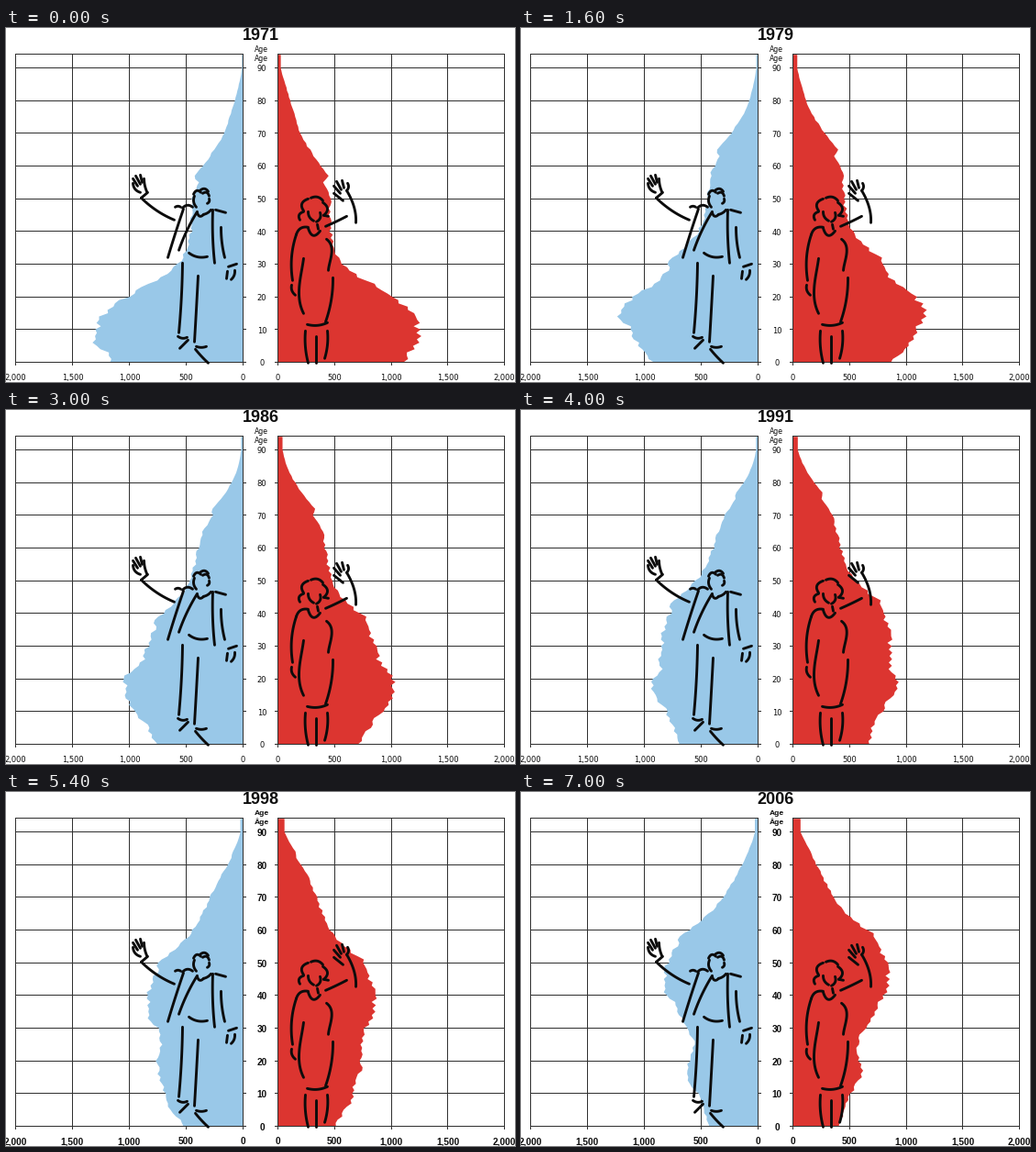
A matplotlib script for the animation above (7.2 s loop, 555x386 px).

```python
import numpy as np
import matplotlib.pyplot as plt
from matplotlib.animation import FuncAnimation

W, H, DPI = 555, 386, 100
PX = 72 / DPI                      # points per pixel
START, YEARS, BOLD_FROM = 1971, 36, 1996
BASE, TOP, PER_AGE = 364.5, 28.5, 3.567
INK, GRID = "#0c0c0c", "#303030"
AGES = np.arange(95)

# zero line, direction, pixels per 500, colour; then the course of life:
# share at birth, loss in childhood, loss around 21, age scale of survival
SIDES = {
    "left": dict(zero=258.5, sign=-1, step=62, color="#99c8e8",
                 birth=1.0, child=0.09, leave=0.30, life=78),
    "right": dict(zero=296.5, sign=1, step=61.75, color="#dc3530",
                  birth=0.945, child=0.075, leave=0.255, life=82.5),
}

# Size of each generation at birth, in pixels, at its turning points.
TURNS = [1880, 1886, 1901, 1908, 1912, 1914, 1916, 1921, 1930, 1935, 1940,
         1945, 1947, 1950, 1957, 1965, 1968, 1971, 1979, 1986, 1990, 1998, 2006]
SIZES = [28, 46, 53, 74, 87, 98, 86, 95, 93, 98, 109,
         138, 154, 158, 172, 169, 153, 146, 113, 94, 89, 65, 53]

fig = plt.figure(figsize=(W / 100, H / 100), dpi=DPI, facecolor="white")
ax = fig.add_axes([0, 0, 1, 1])
ax.set_xlim(0, W)
ax.set_ylim(H, 0)
ax.axis("off")

rng = np.random.default_rng(4)
for side in SIDES.values():
    side["ripple"] = 1 + rng.uniform(-0.03, 0.03, 130)


def widths(side, year):
    """Each generation keeps its size at birth, thinned out by age."""
    age = np.minimum(AGES, 90)
    born = year - age
    childhood = side["birth"] - side["child"] * np.minimum(age / 15, 1)
    leaving = side["leave"] / (1 + np.exp((21 - age) / 2.3))
    survival = np.exp(-(age / side["life"]) ** 7)
    size = np.interp(born, TURNS, SIZES) * side["ripple"][born - TURNS[0]]
    return size * (childhood - leaving) * survival


def outline(side, year):
    zero = side["zero"]
    x = zero + side["sign"] * widths(side, year)
    y = BASE - AGES * PER_AGE
    return np.column_stack([np.r_[zero, x, zero], np.r_[BASE, y, y[-1]]])


def rule(x0, y0, x1, y1, z=1):
    """A line exactly one pixel wide, set on pixel centres."""
    x0, y0, x1, y1 = np.floor([x0, y0, x1, y1]) + 0.5
    ax.plot([x0, x1], [y0, y1], color=GRID, lw=PX, zorder=z, snap=False,
            solid_capstyle="projecting")


def draw_grid():
    for side in SIDES.values():
        zero, sign, step = side["zero"], side["sign"], side["step"]
        end = zero + sign * 4 * step
        for k in range(5):
            x = zero + sign * k * step
            rule(x, TOP, x, BASE + 3, 3 if k == 0 else 1)
        for age in range(0, 100, 10):
            y = BASE - age * PER_AGE
            rule(zero - sign * 3, y, end, y, 3 if age == 0 else 1)
        rule(zero, TOP, end, TOP)


labels = []


def label(x, y, text, plain, bold):
    """A text with its size before and after the change of typeface."""
    item = ax.text(x, y, text, color=INK, ha="center",
                   va="center_baseline", zorder=6)
    labels.append((item, plain, bold))
    return item


def draw_labels():
    for side in SIDES.values():
        for k in range(5):
            x = side["zero"] + side["sign"] * k * side["step"]
            label(x, 380.5, f"{k * 500:,}", 8.4, 10)
    for age in range(0, 100, 10):
        label(279, BASE - age * PER_AGE + 0.5, str(age), 8.4, 10)
    label(278.5, 22.5, "Age", 7.8, 8.5)


def pen(*xy):
    """One smooth pen stroke through a few points."""
    x, y = np.array(xy[::2]) - 0.5, np.array(xy[1::2]) - 0.7
    t = np.r_[0, np.cumsum(np.hypot(np.diff(x), np.diff(y)))]
    t /= t[-1]
    deg = min(len(t) - 1, 3)
    s = np.linspace(0, 1, 24)
    ax.plot(np.polyval(np.polyfit(t, x, deg), s),
            np.polyval(np.polyfit(t, y, deg), s),
            color=INK, lw=2.9 * PX, solid_capstyle="round", zorder=5)


def draw_man():
    # raised hand and arm
    pen(139, 165, 144, 173)
    pen(142, 162, 147, 171)
    pen(147, 161, 149, 169)
    pen(151, 165, 152, 173, 154, 179)
    pen(139, 170, 141, 176, 147, 180)
    pen(155, 180, 148, 186)
    pen(148, 186, 157, 194, 170, 203, 184, 210)
    # head
    pen(206, 184, 205, 189, 208, 196)
    pen(205, 182, 209, 178, 213, 180)
    pen(212, 178, 217, 176, 221, 179)
    pen(215, 181, 219, 180, 222, 184)
    pen(222, 187, 222, 190, 220, 192)
    pen(209, 202, 212, 206, 216, 204)
    pen(216, 204, 219, 203, 224, 199)
    # jacket and arms
    pen(185, 196, 188, 195, 191, 196)
    pen(193, 197, 198, 194, 204, 196)
    pen(194, 198, 186, 222, 177, 251)
    pen(209, 201, 200, 217, 189, 243)
    pen(229, 199, 240, 202)
    pen(226, 199, 226, 230, 228, 257)
    pen(235, 218, 236, 235, 239, 251)
    pen(200, 246, 208, 250, 220, 250)
    # lowered hand
    pen(243, 261, 252, 258)
    pen(242, 266, 241, 274)
    pen(250, 265, 249, 271, 246, 275)
    # legs and shoes
    pen(193, 257, 192, 290, 189, 333)
    pen(210, 271, 208, 308, 206, 343)
    pen(188, 337, 193, 339, 198, 338)
    pen(199, 341, 190, 350)
    pen(208, 348, 213, 349, 219, 348)
    pen(207, 351, 213, 358, 221, 366)


def draw_woman():
    # hair, face and collar
    pen(321, 210, 320, 205, 325, 201)
    pen(325, 200, 323, 193, 330, 187)
    pen(333, 186, 340, 185, 346, 189)
    pen(346, 191, 351, 198, 347, 205)
    pen(347, 205, 352, 206)
    pen(330, 201, 331, 206, 336, 211)
    pen(343, 202, 343, 208, 339, 212)
    pen(330, 219, 336, 227, 343, 222)
    pen(340, 215, 341, 220)
    # sleeves and dress
    pen(330, 218, 322, 219, 317, 226)
    pen(317, 226, 313, 242, 313, 276)
    pen(312, 281, 312, 286, 316, 292)
    pen(325, 252, 322, 270, 320, 288, 325, 312)
    pen(350, 231, 355, 238, 355, 250, 352, 265)
    pen(357, 273, 355, 298, 349, 321)
    pen(329, 324, 340, 325, 351, 322)
    # legs
    pen(327, 331, 327, 349, 330, 366)
    pen(339, 337, 339, 366)
    pen(351, 331, 351, 346, 348, 361)
    # raised arm and hand
    pen(349, 217, 360, 212, 372, 206)
    pen(372, 178, 378, 190, 381, 200, 382, 213)
    pen(358, 181, 368, 189)
    pen(358, 173, 365, 181)
    pen(361, 168, 366, 177)
    pen(367, 167, 369, 175)
    pen(372, 178, 374, 174, 373, 170)


draw_grid()
draw_man()
draw_woman()
draw_labels()
second = label(278.5, 32, "Age", 7.8, 8.5)
title = ax.text(278, 6.7, "", family="Liberation Sans", weight="bold",
                fontsize=18 * PX, color=INK, ha="center",
                va="center_baseline", zorder=6)
for side in SIDES.values():
    side["shape"], = ax.fill([0], [0], color=side["color"], lw=0, zorder=2)


def update(i):
    year = START + i
    late = year >= BOLD_FROM
    title.set_text(str(year))
    second.set_text("Âge" if late else "Age")
    for item, plain, bold in labels:
        item.set_family("Liberation Sans" if late else "DejaVu Sans")
        item.set_weight("bold" if late else "normal")
        item.set_fontsize((bold if late else plain) * PX)
    for side in SIDES.values():
        side["shape"].set_xy(outline(side, year))
    return [title, *(s["shape"] for s in SIDES.values())]


anim = FuncAnimation(fig, update, frames=YEARS, interval=200, repeat=True,
                     repeat_delay=0, blit=False)
plt.show()
```
